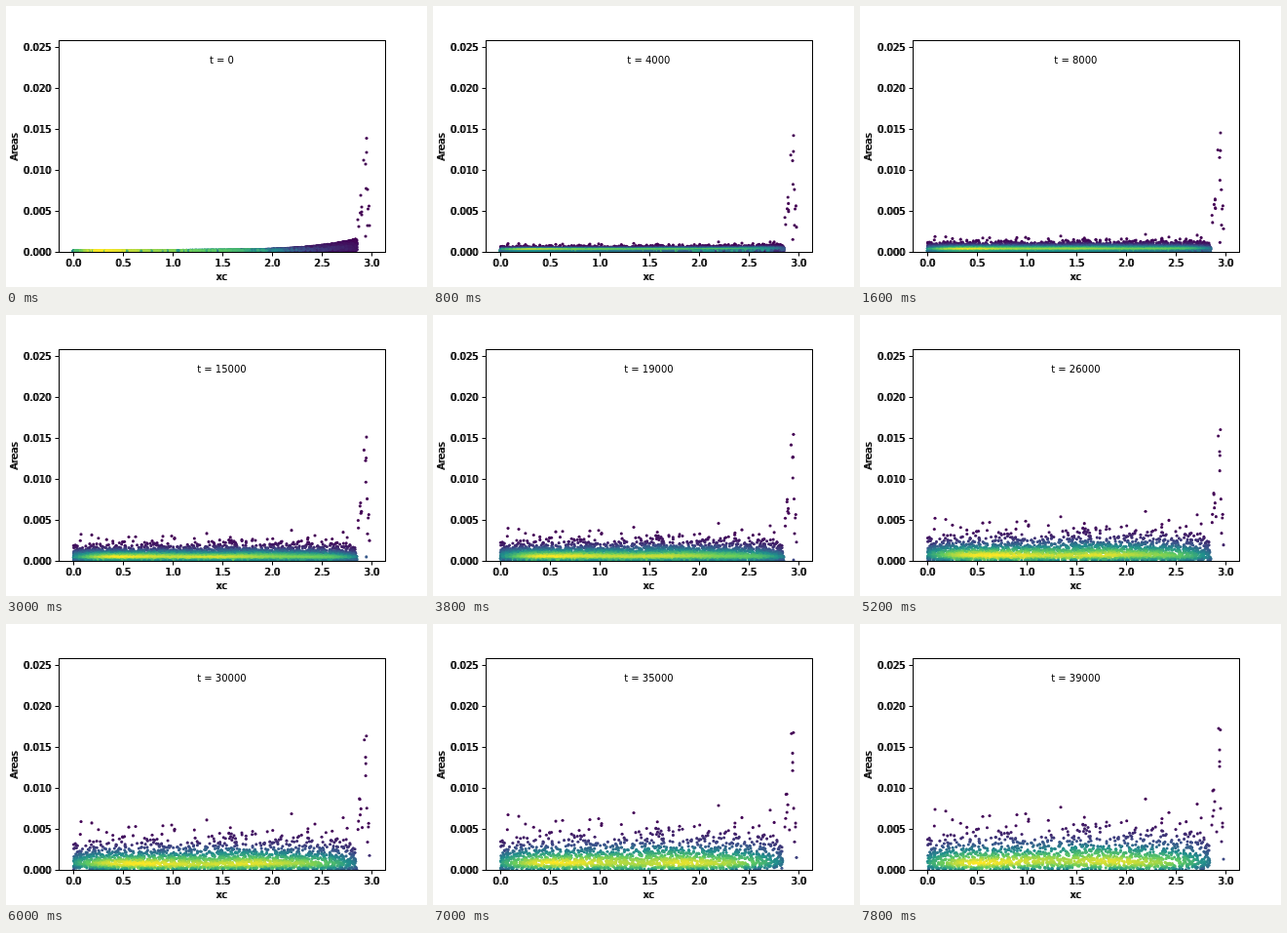
An HTML page with a canvas for the animation above (8000 ms loop, 432 by 288 pixels).

```html
<!DOCTYPE html>
<html lang="en">
<head>
<meta charset="utf-8">
<title>Cell areas</title>
<style>
  html, body { margin: 0; width: 100%; height: 100%; overflow: hidden; background: #fff; }
  canvas { display: block; }
</style>
</head>
<body>
<canvas id="stage" width="432" height="288"></canvas>
<script>
const ctx = document.getElementById('stage').getContext('2d');
const FRAME_MS = 200, FRAMES = 40;
const X0 = 69.3, PX_X = 102, Y0 = 252, PX_Y = 8400;
const CELLS = 16500, WIDTH = 2.85, SHAPE = 1.3;

let seed = 7;
function random() {
  seed = (seed + 0x6D2B79F5) | 0;
  let h = Math.imul(seed ^ (seed >>> 15), 1 | seed);
  h = (h + Math.imul(h ^ (h >>> 7), 61 | h)) ^ h;
  return ((h ^ (h >>> 14)) >>> 0) / 4294967296;
}

// Positions (px) of the largest cells, biggest first.
const largest = [293, 346, 206, 77, 88, 317, 170, 161, 133, 126];

// Low ranks outlive high ones, which shrink away.
const cells = Array.from({ length: CELLS }, (_, i) => {
  const rank = (i + 1) / CELLS;
  const r = random();
  const x = i < largest.length ? (largest[i] - X0) / PX_X
                               : WIDTH * r ** (1 + 0.4 * rank);
  const s = x / WIDTH;
  const start = 0.00011 + random() * (0.00006 + 0.00004 * s)
              + random() * 0.0014 * s ** 6;
  return { rank, px: X0 + x * PX_X, start };
});

// Cells at the right wall: x, y at the start and x, y at the end, in px.
const wall = [
  [370, 135.5, 369.8, 108.5], [367, 158, 368, 107], [370, 150, 369, 141],
  [369, 162, 369, 129], [369.5, 187, 369, 146], [371, 188, 370, 189],
  [363.5, 212, 363, 170], [365, 206, 362, 171], [364, 194, 366, 213],
  [372.5, 205, 372, 204], [371.5, 208, 372, 208], [371, 225, 371, 223],
  [373, 225, 373, 241], [369, 236, 371, 267], [365, 211, 363, 191],
  [365, 214, 364, 182], [361, 219, 362, 197], [362, 226, 361, 206]
];

function pointsAt(t) {
  const mean = Math.hypot(0.00018, 0.0000435 * t);
  const early = Math.exp(-t / 3);
  const points = [];
  for (const c of cells) {
    const v = c.rank * mean / 0.00018;
    if (v > 1) break;
    const grown = mean * 1.08 * (-Math.log(v)) ** (1 / SHAPE);
    const area = early * c.start + (1 - early) * grown;
    points.push({ x: c.px, y: Y0 - area * PX_Y });
  }
  const k = t / 39;
  for (const [xa, ya, xb, yb] of wall) {
    const y = ya + (yb - ya) * k;
    if (y < Y0) points.push({ x: xa + (xb - xa) * k, y });
  }
  return points;
}

function deviation(points, key) {
  let sum = 0, squares = 0;
  for (const p of points) { sum += p[key]; squares += p[key] ** 2; }
  const n = points.length;
  return Math.sqrt(squares / n - (sum / n) ** 2);
}

// Gaussian density estimate on a grid of 4 by 0.5 px.
const COLS = 85, ROWS = 320;
function blur(grid, sigma, step, length) {
  const out = new Float32Array(grid.length);
  const reach = Math.ceil(3 * sigma);
  const kernel = Array.from({ length: reach + 1 }, (_, d) => Math.exp(-d * d / (2 * sigma * sigma)));
  for (let i = 0; i < grid.length; i++) {
    if (!grid[i]) continue;
    const at = Math.floor(i / step) % length;
    const from = Math.max(-reach, -at), to = Math.min(reach, length - 1 - at);
    for (let d = from; d <= to; d++) out[i + d * step] += grid[i] * kernel[Math.abs(d)];
  }
  return out;
}

function addDensity(points) {
  const scott = points.length ** (-1 / 6);
  let grid = new Float32Array(COLS * ROWS);
  for (const p of points) {
    const row = Math.min(ROWS - 1, Math.floor((Y0 - p.y) * 2));
    p.cell = row * COLS + Math.floor((p.x - 54) / 4);
    grid[p.cell]++;
  }
  grid = blur(grid, Math.max(0.8, scott * deviation(points, 'y') * 2), COLS, ROWS);
  grid = blur(grid, scott * deviation(points, 'x') / 4, 1, COLS);
  let max = 0;
  for (const p of points) {
    p.density = grid[p.cell];
    max = Math.max(max, p.density);
  }
  for (const p of points) p.density /= max;
}

const viridis = [[68, 1, 84], [59, 82, 139], [33, 145, 140], [94, 201, 98], [253, 231, 37]];
const palette = Array.from({ length: 101 }, (_, i) => {
  const k = i / 25, j = Math.min(3, Math.floor(k));
  const rgb = viridis[j].map((a, n) => Math.round(a + (viridis[j + 1][n] - a) * (k - j)));
  return `rgb(${rgb})`;
});

function line(xa, ya, xb, yb) {
  ctx.beginPath();
  ctx.moveTo(xa, ya);
  ctx.lineTo(xb, yb);
  ctx.stroke();
}

// Axis text is printed twice, slightly apart.
function label(text, x, y, align) {
  ctx.textAlign = align;
  ctx.fillText(text, x - 0.5, y);
  ctx.fillText(text, x + 0.5, y);
}

function drawAxes() {
  ctx.strokeStyle = ctx.fillStyle = '#000';
  ctx.lineWidth = 1;
  ctx.strokeRect(54.5, 35.5, 335, 217);
  for (let i = 0; i < 7; i++) {
    const x = 69.5 + 51 * i;
    line(x, 252.5, x, 256.5);
    label((i / 2).toFixed(1), x, 267, 'center');
  }
  for (let i = 0; i < 6; i++) {
    const y = 252.5 - 42 * i;
    line(50.5, y, 54.5, y);
    label((i * 0.005).toFixed(3), 46.7, y + 3.5, 'right');
  }
  label('xc', 221.4, 280.7, 'center');
  ctx.save();
  ctx.translate(12, 144.5);
  ctx.rotate(-Math.PI / 2);
  label('Areas', 0, 0, 'center');
  ctx.restore();
}

function draw(t) {
  ctx.fillStyle = '#fff';
  ctx.fillRect(0, 0, 432, 288);
  ctx.font = '10px "DejaVu Sans", sans-serif';

  const points = pointsAt(t);
  addDensity(points);
  ctx.save();
  ctx.beginPath();
  ctx.rect(54, 35, 335, 217);
  ctx.clip();
  for (const p of points) {
    ctx.fillStyle = palette[Math.round(p.density * 100)];
    ctx.beginPath();
    ctx.arc(p.x, p.y, 1.55, 0, 2 * Math.PI);
    ctx.fill();
  }
  ctx.restore();

  drawAxes();
  ctx.textAlign = 'center';
  ctx.fillText(`t = ${t * 1000}`, 221.4, 58.8);
}

let shown = -1;
function tick() {
  const frame = Math.floor(performance.now() / FRAME_MS) % FRAMES;
  if (frame !== shown) draw(shown = frame);
  requestAnimationFrame(tick);
}
tick();
</script>
</body>
</html>
```
